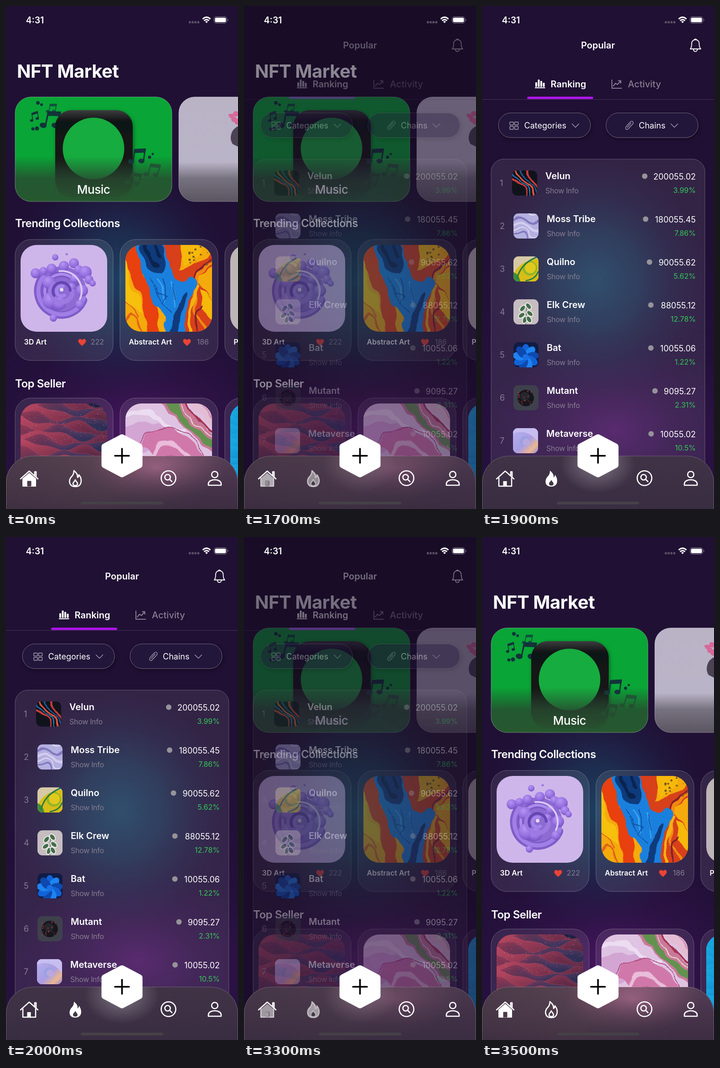
Animation, 509 px wide and 1101 px high, one loop 3.6 s. Source, as an HTML page:

```html
<!DOCTYPE html>
<html lang="en">
<head>
<meta charset="utf-8">
<title>Market app</title>
<style>
html, body { margin: 0; width: 100%; height: 100%; overflow: hidden; background: #000 }
svg { display: block; width: 509px; height: 1101px }
text { font-family: Inter, Roboto, sans-serif; fill: #fff }
.h1 { font-size: 40px; font-weight: 700; letter-spacing: -.012em }
.h2 { font-size: 24px; font-weight: 600; letter-spacing: -.02em }
.h3 { font-size: 20px; font-weight: 600 }
.m { font-size: 18px }
.s { font-size: 16px }
.b { font-weight: 600 }
.dim { fill: #867d91 }
.end { text-anchor: end }
.mid { text-anchor: middle }
.line { fill: none; stroke: #fff; stroke-width: 2.6; stroke-linecap: round; stroke-linejoin: round }
.thin { fill: none; stroke: #a69eae; stroke-width: 1.4; stroke-linecap: round; stroke-linejoin: round }
.glass { fill: #fff; fill-opacity: .085; stroke: #fff; stroke-opacity: .27 }
</style>
</head>
<body>
<svg viewBox="0 0 509 1101">
<defs>
  <linearGradient id="base" x2="0" y2="1">
    <stop stop-color="#201033"/><stop offset=".45" stop-color="#201035"/><stop offset="1" stop-color="#27113f"/>
  </linearGradient>
  <radialGradient id="blue"><stop stop-color="#1d3f60"/><stop offset=".4" stop-color="#1d3859" stop-opacity=".7"/><stop offset="1" stop-color="#1f204a" stop-opacity="0"/></radialGradient>
  <radialGradient id="violet"><stop stop-color="#56196f" stop-opacity=".75"/><stop offset=".5" stop-color="#46175f" stop-opacity=".35"/><stop offset="1" stop-color="#3b1558" stop-opacity="0"/></radialGradient>
  <radialGradient id="glow"><stop stop-color="#fff" stop-opacity=".6"/><stop offset=".45" stop-color="#fff" stop-opacity=".28"/><stop offset="1" stop-color="#fff" stop-opacity="0"/></radialGradient>
  <radialGradient id="rose"><stop stop-color="#a5698a"/><stop offset="1" stop-color="#8b5876" stop-opacity="0"/></radialGradient>
  <linearGradient id="barA" y2=".3"><stop stop-color="#4b3a49"/><stop offset=".6" stop-color="#604957"/><stop offset="1" stop-color="#513a54"/></linearGradient>
  <linearGradient id="barB" x2="0" y2="1"><stop stop-color="#403346"/><stop offset="1" stop-color="#392d42"/></linearGradient>
  <linearGradient id="barShade" x2="0" y2="1"><stop stop-color="#35283a" stop-opacity="0"/><stop offset="1" stop-color="#35283a" stop-opacity=".7"/></linearGradient>
  <linearGradient id="plate" x2="0" y2="1"><stop stop-color="#3b3d3e"/><stop offset=".13" stop-color="#101213"/><stop offset=".7" stop-color="#171a1a"/><stop offset="1" stop-color="#1b3023"/></linearGradient>
  <linearGradient id="frost" x2="0" y2="1"><stop stop-color="#28442f" stop-opacity="0"/><stop offset=".5" stop-color="#28482f" stop-opacity=".82"/><stop offset="1" stop-color="#28552f" stop-opacity=".96"/></linearGradient>
  <linearGradient id="mist" x2="0" y2="1"><stop stop-color="#bab3c6"/><stop offset=".62" stop-color="#bab4c8"/><stop offset=".78" stop-color="#77727f"/><stop offset="1" stop-color="#5b5562"/></linearGradient>
  <radialGradient id="ball" cx=".4" cy=".3" r=".75"><stop stop-color="#b596f3"/><stop offset=".6" stop-color="#9670e0"/><stop offset="1" stop-color="#7450c0"/></radialGradient>
  <linearGradient id="dusk" x2="1" y2="1"><stop stop-color="#b5b2ee"/><stop offset=".55" stop-color="#a99de2"/><stop offset=".8" stop-color="#edb88f"/><stop offset="1" stop-color="#8f86dc"/></linearGradient>
  <linearGradient id="crestRed" y2="1"><stop stop-color="#b94760"/><stop offset=".45" stop-color="#6b2c48"/><stop offset="1" stop-color="#1b2140"/></linearGradient>
  <linearGradient id="crestNavy" y2="1"><stop stop-color="#8b3550"/><stop offset=".4" stop-color="#37335c"/><stop offset="1" stop-color="#1a2344"/></linearGradient>
  <linearGradient id="crestBlue" y2="1"><stop stop-color="#18a9e0"/><stop offset=".5" stop-color="#0b60b4"/><stop offset="1" stop-color="#0a2d70"/></linearGradient>
  <filter id="flow" x="-.1" y="-.1" width="1.2" height="1.2" color-interpolation-filters="sRGB">
    <feTurbulence type="fractalNoise" baseFrequency=".024" numOctaves="2" seed="7"/>
    <feDisplacementMap in="SourceGraphic" scale="24" xChannelSelector="R" yChannelSelector="G"/>
    <feGaussianBlur stdDeviation=".6"/>
  </filter>
  <filter id="shade" x="-.3" y="-.3" width="1.6" height="1.6"><feDropShadow dy="3" stdDeviation="4" flood-opacity=".4"/></filter>
  <clipPath id="art"><rect width="190" height="190" rx="35"/></clipPath>
  <clipPath id="thumb"><rect width="55" height="55" rx="11"/></clipPath>
  <clipPath id="hero"><rect width="344" height="229" rx="35"/></clipPath>
  <clipPath id="barClip"><rect y="985" width="509" height="180" rx="58"/></clipPath>
  <g id="note">
    <ellipse cx="-8" cy="9" rx="4.5" ry="3.4"/><ellipse cx="7" cy="6" rx="4.5" ry="3.4"/>
    <path d="M-5 9V-9L10-12V6" fill="none" stroke="currentColor" stroke-width="2"/>
    <path d="M-6-10L11-13V-7L-6-4Z"/>
  </g>
  <path id="heart" d="M0 8C-6 3-8.500 0-8.500-3C-8.500-8-2-9 0-4.500C2-9 8.500-8 8.500-3C8.500 0 6 3 0 8Z" fill="#ea4337"/>
  <path id="flame" d="M-3-18C3-13 6-9 5-3Q8-5 8-9C16 1 15 17 0 17C-15 17-15 2-8-5C-4-9-3-13-3-18Z"/>
  <path id="drop" d="M0 2C1 6 5 7 5 11C5 16-5 16-5 11C-5 7-1 6 0 2Z"/>
</defs>

<g id="back">
  <rect width="509" height="1101" fill="url(#base)"/>
  <ellipse cx="290" cy="930" rx="290" ry="210" fill="url(#violet)"/>
  <ellipse cx="250" cy="600" rx="240" ry="260" fill="url(#blue)"/>
</g>
<g id="home"></g>
<g id="popular"></g>

<g clip-path="url(#barClip)">
  <rect y="985" width="509" height="116" fill="url(#barB)"/>
  <ellipse cx="254" cy="1004" rx="82" ry="62" fill="url(#glow)" opacity=".65"/>
  <g id="homeBar">
    <rect y="985" width="509" height="116" fill="url(#barA)"/>
    <ellipse cx="330" cy="1012" rx="150" ry="70" fill="url(#rose)"/>
    <rect y="985" width="509" height="116" fill="url(#barShade)"/>
  </g>
</g>
<rect x=".5" y="985" width="508" height="180" rx="58" fill="none" stroke="#fff" stroke-opacity=".22"/>
<rect x="164" y="1085" width="181" height="6" rx="3" fill="#454147"/>

<path class="line" d="M32 1035L51 1018L70 1035M63 1027V1019.500H66V1030"/>
<g id="homeOn">
  <path d="M37 1035L51 1023L65 1035V1051H37Z" fill="#fff" stroke="#fff" stroke-width="2" stroke-linejoin="round"/>
  <rect x="46.500" y="1039.500" width="9" height="12" rx="1" fill="#4b3b48"/>
  <g class="line" transform="translate(152 1035)"><use href="#flame"/><use href="#drop"/></g>
</g>
<g id="popularOn">
  <path class="line" d="M37 1033V1051H65V1033"/><rect x="46.500" y="1040" width="8" height="11" fill="#fff"/>
  <g transform="translate(152 1035)"><use href="#flame" fill="#fff"/><use href="#drop" fill="#403744"/></g>
</g>
<g class="line">
  <circle cx="356.500" cy="1033.500" r="16"/><circle cx="354.500" cy="1031.500" r="6"/><path d="M359 1036L364 1041"/>
  <circle cx="458" cy="1025.500" r="6.800"/><path d="M444 1049V1046C444 1034 472 1034 472 1046V1049Z"/>
</g>
<g transform="translate(254.500 984.500)" stroke-linejoin="round" stroke-linecap="round">
  <path d="M0-40L38-20V20L0 40L-38 20V-20Z" fill="#fff" stroke="#fff" stroke-width="14"/>
  <path d="M-15.500 0H15.500M0-15.500V15.500" stroke="#000" stroke-width="3.600"/>
</g>

<text class="b" x="43.500" y="37.500" font-size="19.500">4:31</text>
<g fill="#5b5067" id="signal"></g>
<g fill="none" stroke="#fff" stroke-width="3">
  <path d="M431.500 28.500Q440 20.500 448.500 28.500M434.600 32.200Q440 27.200 445.400 32.200"/>
  <path d="M440 37.500L437 34.200Q440 31.800 443 34.200Z" fill="#fff" stroke="none"/>
</g>
<rect x="456.500" y="23.500" width="28" height="14" rx="4.500" fill="none" stroke="#8f8798"/>
<rect x="458.500" y="25.500" width="24" height="10" rx="2.500" fill="#fff"/>
<path d="M486.500 28Q489 30.500 486.500 33Z" fill="#8f8798"/>
</svg>

<script>
const $ = id => document.getElementById(id);
const range = (n, f) => Array.from({ length: n }, (_, i) => f(i)).join('');
let seed = 11;
const rnd = () => (seed = seed * 16807 % 2147483647) / 2147483647;

const text = (cls, x, y, str) => `<text class="${cls}" x="${x}" y="${y}">${str}</text>`;
const path = (fill, d) => `<path fill="${fill}" d="${d}"/>`;
const stroke = (color, w, d) => `<path fill="none" stroke="${color}" stroke-width="${w}" stroke-linecap="round" d="${d}"/>`;
const dot = (x, y, r, fill) => `<circle cx="${x}" cy="${y}" r="${r}" fill="${fill}"/>`;
const fillAll = color => `<rect width="190" height="190" fill="${color}"/>`;
const flow = body => `<g filter="url(#flow)">${body}</g>`;
const at = (x, y, clip, body) => `<g transform="translate(${x} ${y})"><g clip-path="url(#${clip})">${body}</g></g>`;

$('signal').innerHTML = range(4, i => `<rect x="${401 + i * 6.200}" y="33" width="4.600" height="5" rx="1.500"/>`);

// Artwork, drawn in 190 x 190 boxes

function swirl() {
  const arc = (r, from, to, w, color) => {
    const pt = a => `${90 + r * Math.cos(a)} ${101 + r * Math.sin(a)}`;
    return stroke(color, w, `M${pt(from)}A${r} ${r} 0 ${to - from > Math.PI ? 1 : 0} 1 ${pt(to)}`);
  };
  const balls = [[76, 27, 7], [101, 20, 2.500], [33, 62, 11], [50, 57, 9], [68, 52, 11], [95, 46, 11], [117, 40, 11],
    [127, 54, 10], [142, 60, 14], [150, 76, 10], [158, 84, 7], [135, 100, 13], [62, 82, 14], [118, 74, 10],
    [66, 122, 18], [86, 128, 14], [112, 92, 9], [130, 130, 10], [72, 160, 8]];
  return fillAll('#cfb6ea') + dot(90, 101, 54, '#8d6bd2') +
    arc(52, .4, 3.700, 17, '#805cc9') + arc(51, .3, 3.800, 9, '#a07fe6') +
    arc(37, 1.800, 5.800, 13, '#7b58c3') + arc(37, 1.800, 5.700, 6, '#ab8cee') +
    balls.map(([x, y, r]) => dot(x, y, r, 'url(#ball)')).join('') +
    arc(44, 4.600, 6.700, 4, '#dac9f6') + arc(24, 0, 3.900, 10, '#9c7ae2') + arc(19, 2.600, 6.200, 6, '#6646b4') +
    arc(11, 1, 5, 7, '#a484ea') + dot(90, 98, 4, '#e5daf7');
}

const abstract = () => fillAll('#f4aa0c') + flow(
  path('#e8400f', 'M-10-10H30Q30 40 52 95T75 200H48Q48 140 18 72Q4 40-10 40Z') +
  path('#f6c00d', 'M-10 15Q12 45 10 80Q38 125 40 150Q20 140-10 120Z') +
  stroke('#e2601a', 3, 'M-10 180Q15 140 28 165T45 200M0 125Q22 135 30 160') +
  path('#d8401a', 'M85-10H118Q128 30 118 55Q160 45 200 5V38Q165 62 155 85Q190 100 200 150V200H118Q140 110 100 65Z') +
  path('#f6b80b', 'M118-10H175Q165 25 130 48Q120 20 118-10ZM165 100Q200 110 195 165Q165 140 165 100Z') +
  stroke('#f08a12', 7, 'M195 30Q150 65 150 110T185 200') + stroke('#7a2030', 3, 'M195 18Q145 65 137 115M172 130Q145 160 155 200') +
  stroke('#f3b113', 6, 'M158 92Q138 145 140 200') +
  path('#1a80de', 'M26-10H84Q96 35 104 66Q118 92 140 74Q160 74 152 98Q135 125 126 200H88Q90 150 62 132Q46 105 44 70Q24 35 26-10Z') +
  path('#0f3b7c', 'M30-10H74Q92 15 90 44Q76 72 58 56Q34 35 30-10ZM132 100Q140 110 126 145L110 200H94Q98 165 112 145Z') +
  stroke('#0a2450', 7, 'M42 0Q52 30 68 45M62 2L80 30') +
  stroke('#39a4f0', 3, 'M72 76Q88 95 86 125M100 80Q114 105 106 135') +
  stroke('#0d4694', 1.600, 'M55 75L70 100L95 108M82 72L92 112L78 130M105 85L110 120M70 100L78 130L100 150M60 90L75 115') +
  stroke('#d63a2a', 2.500, 'M84 0Q98 25 102 50')
) + range(18, () => dot(140 + rnd() * 48, rnd() * 45, .800 + rnd() * 2.200, '#7a5a1c'));

function waves(fill, line) {
  const edge = (i, dy) => range(39, k => {
    const y = i * 13 - 18 + dy + k * .5 + 7 * Math.sin(k * .24 + i * 1.300) + 4 * Math.sin(k * .43 - i * 1.700);
    return `${k ? 'L' : 'M'}${k * 5} ${y.toFixed(1)}`;
  });
  return fillAll('#1c2141') + range(15, i =>
    `<path d="${edge(i, 0)}V215H0Z" fill="url(#${fill[i % fill.length]})"/>` +
    range(4, j => `<path d="${edge(i, j * 3)}" fill="none" stroke="${line}" stroke-opacity="${.6 - j * .14}"/>`));
}
const redWaves = () => waves(['crestRed', 'crestNavy'], '#b94b66') +
  range(140, () => dot(rnd() * 190, rnd() * 85, .5, '#dda4b2'));
const blueWaves = () => waves(['crestBlue'], '#21b4e8');

const marble = () => fillAll('#dfc3e2') + flow(
  path('#d3a5d3', 'M-10 60Q40 25 85 50Q70 80 30 115L-10 145Z') +
  stroke('#ecdcf1', 10, 'M-10 25Q45 5 72 35T130 60') +
  path('#d078a9', 'M30 92Q70 38 110 58Q150 85 185 145H60Q80 110 30 92Z') +
  stroke('#e9bcd9', 8, 'M55 115Q80 70 110 90T165 160') +
  stroke('#ad4a80', 2, 'M20 95Q60 48 105 55T175 130M70 125Q95 95 125 130') +
  path('#c9799a', 'M72-10H130Q150 30 200 75V110Q160 95 135 55Q100 30 72-10Z') +
  path('#63924f', 'M84-10H112Q120 25 150 48Q175 70 200 85V103Q165 85 140 55Q108 35 84-10Z') +
  stroke('#e6d9c4', 2, 'M118-10Q130 25 155 45T200 80') + stroke('#a63250', 4, 'M130-10Q150 30 200 68') +
  path('#e3bdd3', 'M140-10H200V56Q155 25 140-10Z') + stroke('#d594b5', 3, 'M160-10Q175 20 200 35'));

// Home screen

const card = (x, y, art, label = '', likes = '') =>
  `<rect class="glass" x="${x}" y="${y}" width="215" height="265" rx="35"/>` + at(x + 12, y + 12, 'art', art) +
  text('s b', x + 19.500, y + 229.500, label) +
  (likes && `<use href="#heart" x="${x + 147}" y="${y + 225}"/>` + text('s dim end', x + 195, y + 229.500, likes));

const note = (x, y, size, turn, color) =>
  `<use href="#note" fill="${color}" color="${color}" transform="translate(${x} ${y}) rotate(${turn}) scale(${size})"/>`;

const ink = '#12333a';
const music = `<rect width="344" height="229" fill="#09a536"/>` +
  note(80, 25, .900, 10, '#10513c') + note(42, 43, .850, -8, ink) + note(78, 50, 1.700, 12, ink) +
  [[50, 13, 4], [58, 17, 3], [39, 70, 3.500], [48, 69, 4.500], [295, 132, 3.500], [302, 125, 2.500]].map(d => dot(...d, ink)).join('') +
  `<rect x="88" y="29" width="170" height="190" rx="36" fill="url(#plate)" filter="url(#shade)"/>` +
  dot(172, 113, 67.500, '#16ac3f') + note(268, 130, 1.500, 8, ink) + note(301, 161, 1.350, 16, '#1a6038') + note(260, 180, 1.300, 20, '#185533') +
  `<rect y="130" width="344" height="99" fill="url(#frost)"/>`;

const portrait = `<rect width="344" height="229" fill="url(#mist)"/>` +
  path('#4b4354', 'M130 64Q118 70 115 82Q112 94 118 103L130 109Z') +
  [[116, 42, 5], [125, 37, 6], [121, 49, 6], [129, 54, 7], [112, 40, 3]].map(d => dot(...d, '#d6699a')).join('');

const heroFrame = x => `<rect x="${x}" y="199" width="344" height="229" rx="35" fill="none" stroke="#fff" stroke-opacity=".35"/>`;

$('home').innerHTML = text('h1', 24, 157, 'NFT Market') +
  at(20, 199, 'hero', music) + heroFrame(20) + at(379, 199, 'hero', portrait) + heroFrame(379) +
  `<text class="mid" x="192" y="411" font-size="26" font-weight="500" letter-spacing="-.5">Music</text>` +
  text('h2', 20, 484, 'Trending Collections') +
  card(20, 511, swirl(), '3D Art', '222') + card(250, 511, abstract(), 'Abstract Art', '186') +
  card(480, 511, fillAll('#bdb5b6'), 'Photo', '140') +
  text('h2', 20, 835, 'Top Seller') +
  card(20, 858, redWaves()) + card(250, 858, marble()) + card(480, 858, blueWaves());

// Ranking screen, thumbnails in 55 x 55 boxes

const thumbs = [
  fillAll('#11131c') + flow(range(5, i => stroke(['#c83c3b', '#2376b5', '#e2553f', '#1d5c9c'][i % 4], 4 - i % 2,
    `M${-22 + i * 13}-10Q${3 + i * 9} 20 ${20 + i * 8} 30T${32 + i * 13} 75`))),
  fillAll('#b4b0e0') + flow(range(5, i => stroke(['#e4e0f5', '#8177bd', '#d3cdee'][i % 3], 2 + i % 3 * 2, `M-10 ${i * 14}Q20 ${i * 9 - 10} 32 ${i * 14}T75 ${i * 12}`))),
  fillAll('#d7c9a6') + path('#d8bd17', 'M0 42Q10 10 55 5V55H0Z') + path('#3f8e3b', 'M0 35Q12 38 15 55H0Z') +
    dot(36, 26, 16, '#93b52a') + dot(37, 25, 12, '#e2c91d') + stroke('#267d43', 3, 'M8 48Q16 16 50 2M28 53Q48 50 54 34'),
  fillAll('#c5bdbf') + stroke('#61715a', 1.500, 'M27 55Q30 25 27 8') +
    [[20, 20, 40], [33, 15, -40], [18, 35, 55], [36, 31, -50], [25, 45, 20], [34, 44, -30]].map(([x, y, a]) =>
      `<ellipse cx="${x}" cy="${y}" rx="5" ry="8" fill="#426e4b" stroke="#eee9e8" stroke-width="2" transform="rotate(${a} ${x} ${y})"/>`).join(''),
  fillAll('#101c45') + range(9, i => `<ellipse cx="27" cy="19" rx="9" ry="15" fill="${['#1263d7', '#1d84f2', '#0d49ae'][i % 3]}" transform="rotate(${i * 40} 27 33)"/>`) +
    dot(27, 33, 7, '#1a70e5'),
  fillAll('#3e414c') + dot(27, 28, 18, '#16171d') + dot(25, 25, 10, '#25262c') +
    range(22, () => dot(10 + rnd() * 34, 13 + rnd() * 30, .600 + rnd(), '#9b3038')),
  fillAll('#a9a5e5') + `<rect width="55" height="55" fill="url(#dusk)"/>` + path('#c7bdf0', 'M0 12Q30 0 55 30V0H0Z') + dot(26, 29, 11, '#9aa1e4') + dot(29, 31, 8, '#b9a8df')
];

const rows = [
  ['Velun', '200055.02', '3.99%', 66, 357], ['Moss Tribe', '180055.45', '7.86%', 69, 359],
  ['Quilno', '90055.62', '5.62%', 69, 367.500], ['Elk Crew', '88055.12', '12.78%', 69, 370.500],
  ['Bat', '10055.06', '1.22%', 69, 370.500], ['Mutant', '9095.27', '2.31%', 69, 379.500],
  ['Metaverse', '10055.02', '10.5%', 68, 371]
];
const row = ([name, price, gain, x, coin], i) => {
  const y = i * 94;
  return text('m dim', 39, y + 394, i + 1) + at(x, y + 360, 'thumb', thumbs[i]) +
    text('h3', x + 73, y + 379, name) +
    `<text class="s dim" x="${x + 73}" y="${y + 410}" letter-spacing="-.3">Show Info</text>` +
    dot(coin, y + 372.500, 6, '#96939a') + text('m end', 469, y + 379.500, price) +
    `<text class="s end" x="469" y="${y + 409}" style="fill:#34c759">${gain}</text>`;
};

const pill = x => `<rect x="${x}" y="234" width="202" height="54" rx="27" fill="#24143a" stroke="#71667d" filter="url(#shade)"/>`;
const chevron = x => `<path class="thin" d="M${x} 258L${x + 7.500} 265.500L${x + 15} 258"/>`;

$('popular').innerHTML = text('h3 mid', 254.500, 93, 'Popular') +
  `<g class="line" style="stroke-width:1.800"><path d="M457 94Q460 91 460 82C460 71 476.500 71 476.500 82Q476.500 91 480 94ZM464 95Q464 99.500 468 99.500T472.500 95M466 73.500Q468 71 470.500 73.500"/></g>` +
  `<path d="M0 204.500H509" stroke="#49305c"/><rect x="99" y="198.500" width="145" height="5" rx="2.500" fill="#b414f4"/>` +
  [[117, 167], [122.500, 161], [128, 164], [133.500, 168]].map(([x, y]) => `<rect x="${x}" y="${y}" width="4" height="${177 - y}" rx="1" fill="#fff"/>`).join('') +
  path('#fff', 'M116 178H138.500V180H116Z') + text('h3', 150.500, 177.500, 'Ranking') +
  `<g class="line" style="stroke:#867d91;stroke-width:2"><path d="M285 162V180H306M288 175L293 169L297 172L304 164M299 163.500H304.500V169"/></g>` +
  `<text class="dim" x="320" y="177.500" font-size="20" font-weight="500">Activity</text>` +
  pill(36) + pill(272) + text('m', 92.500, 268, 'Categories') + text('m', 344, 268, 'Chains') + chevron(197.500) + chevron(414.500) +
  range(4, i => `<rect class="thin" x="${61 + i % 2 * 10.500}" y="${254 + (i >> 1) * 9.500}" width="8" height="6.500" rx="1"/>`) +
  `<path class="thin" d="M330 259L321 269Q317 272 315.500 269Q314 266 317 263L325 254Q329 250 331 253.500Q333 256 330 259M327 256L319 266"/>` +
  `<rect class="glass" x="20" y="335" width="469" height="800" rx="28"/>` + rows.map(row).join('');

// Cross-fade between the two screens, advancing ten times a second

const ease = (t, start, span) => {
  const u = Math.min(1, Math.max(0, (t - start) / span));
  return u * u * (3 - 2 * u);
};
const show = (id, a) => $(id).setAttribute('opacity', a.toFixed(3));

function draw(now) {
  const t = Math.floor(now % 3600 / 100) * 100;
  const p = ease(t, 1550, 340) - ease(t, 3150, 300);
  show('back', 1 - p * (1 - p));
  show('home', (1 - p) ** 1.3);
  show('popular', p ** 1.3);
  show('homeBar', 1 - p);
  show('homeOn', 1 - p);
  show('popularOn', p);
}
const start = performance.now();
function tick() {
  draw(performance.now() - start);
  requestAnimationFrame(tick);
}
tick();
</script>
</body>
</html>
```
